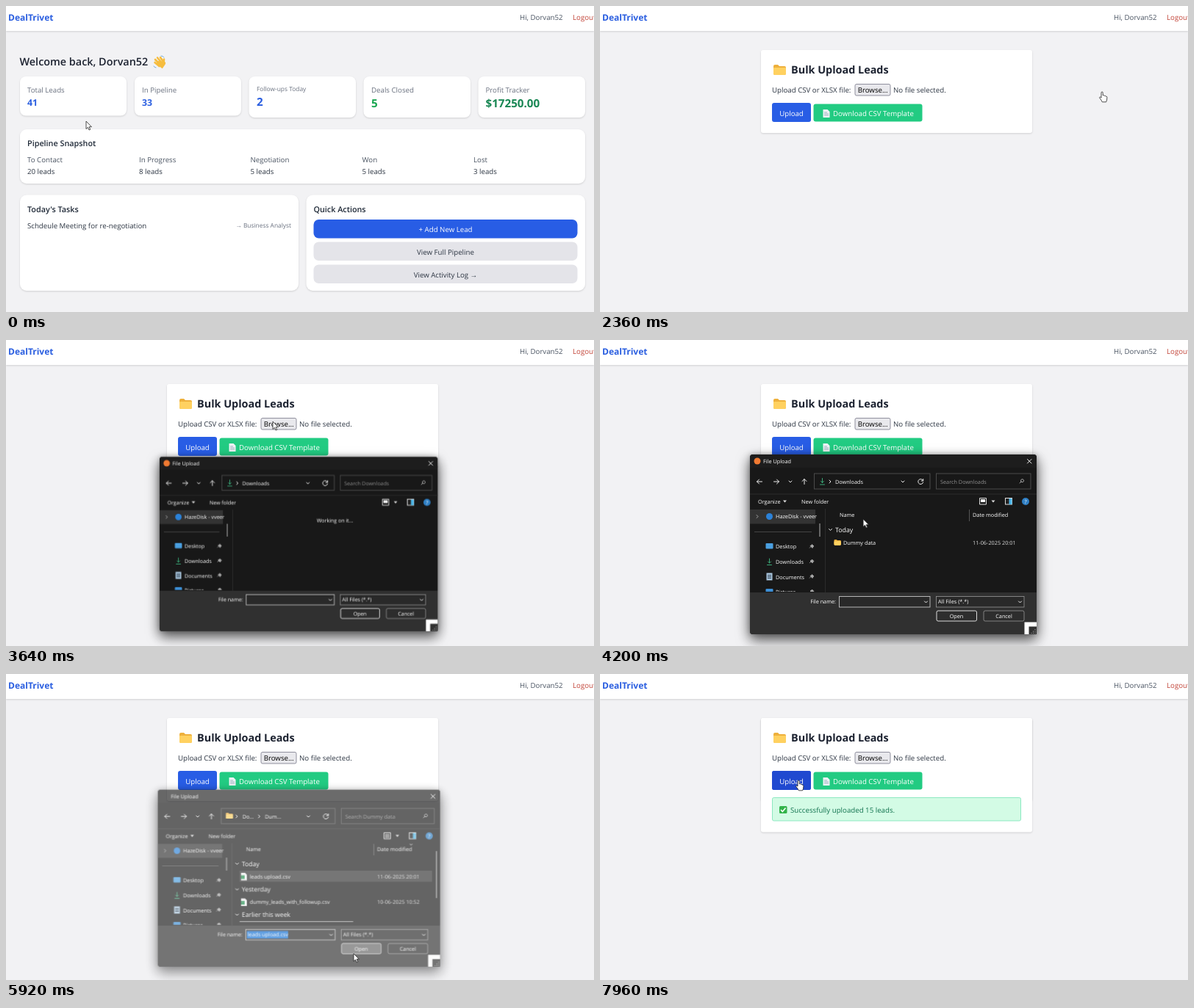
An HTML page for the animation above (8 s loop, 800 px wide and 417 px high).

```html
<!DOCTYPE html>
<html lang="en">
<head>
<meta charset="utf-8">
<title>Lead upload</title>
<style>
html, body { margin: 0; width: 100%; height: 100%; overflow: hidden; background: #f2f2f4; }
svg { display: block; width: 100%; height: 100%; }
text { font-family: "Open Sans", "Noto Sans", sans-serif; font-size: 9.7px; fill: #2d3643; text-rendering: geometricPrecision; white-space: pre; }
.sm { font-size: 8.4px; }
.h { font-size: 10.8px; font-weight: 600; fill: #1f2937; }
.title { font-size: 14.4px; font-weight: 700; fill: #1c2230; }
.grey { fill: #6b7280; } .pale { fill: #9ca3af; } .slate { fill: #4b5563; }
.blue { fill: #2a5ee0; } .white { fill: #fff; } .red { fill: #c24438; }
.num { font-size: 12.3px; font-weight: 700; }
.big { font-size: 15.2px; }
.logo { font-size: 12px; font-weight: 700; }
.semi { font-weight: 600; }
.mid { text-anchor: middle; } .end { text-anchor: end; }
.card { fill: #fff; filter: drop-shadow(0 1px 1.2px rgba(0,0,0,.14)); }
.line { fill: none; stroke: #efefef; stroke-width: 1; stroke-linecap: round; stroke-linejoin: round; }
.dialog text { font-size: 7.3px; fill: #fff; }
.dialog .group { font-size: 8.8px; }
.dialog .dim { fill: #8f8f8f; }
.dialog .date { fill: #dcdcdc; }

/* Timed parts: fully on or off inside one 8 s loop */
.t { opacity: 0; animation: 8s step-end infinite; }
@keyframes dash { 0% { opacity: 1 } 10% { opacity: 0 } }
@keyframes leads { 0% { opacity: 0 } 10% { opacity: 1 } 29% { opacity: 0 } }
@keyframes upload { 0% { opacity: 0 } 29% { opacity: 1 } }
@keyframes pipeline-hover { 0% { opacity: 0 } 3.5% { opacity: 1 } }
@keyframes leads-hover { 0% { opacity: 0 } 15.5% { opacity: 1 } }
@keyframes browse-hover { 0% { opacity: 0 } 35.5% { opacity: 1 } 44.5% { opacity: 0 } }
@keyframes working { 0% { opacity: 1 } 48% { opacity: 0 } }
@keyframes downloads { 0% { opacity: 1 } 58% { opacity: 0 } }
@keyframes listing { 0% { opacity: 0 } 48% { opacity: 1 } 58% { opacity: 0 } }
@keyframes folder-hover { 0% { opacity: 0 } 53.5% { opacity: 1 } }
@keyframes dummy { 0% { opacity: 0 } 58% { opacity: 1 } }
@keyframes row-hover { 0% { opacity: 1 } 66% { opacity: 0 } }
@keyframes chosen-name { 0% { opacity: 0 } 64.5% { opacity: 1 } }
@keyframes open-hover { 0% { opacity: 0 } 69% { opacity: 1 } }
@keyframes app-icon { 0% { opacity: 1 } 73.5% { opacity: 0 } }
@keyframes no-file { 0% { opacity: 1 } 75.5% { opacity: 0 } 95% { opacity: 1 } }
@keyframes has-file { 0% { opacity: 0 } 75.5% { opacity: 1 } 95% { opacity: 0 } }
@keyframes template-hover { 0% { opacity: 0 } 81% { opacity: 1 } 84.5% { opacity: 0 } }
@keyframes upload-hover { 0% { opacity: 0 } 85% { opacity: 1 } }
@keyframes success { 0% { opacity: 0 } 95% { opacity: 1 } }
@keyframes hand { 0% { opacity: 0 } 3.5% { opacity: 1 } 10% { opacity: 0 } 15.5% { opacity: 1 } 30% { opacity: 0 } 81% { opacity: 1 } }
@keyframes arrow { 0% { opacity: 1 } 3.5% { opacity: 0 } 10% { opacity: 1 } 15.5% { opacity: 0 } 30% { opacity: 1 } 81% { opacity: 0 } }

.dialog { transform-origin: 366px 262px; opacity: 0; animation: window 8s linear infinite; }
.frame { filter: drop-shadow(0 7px 9px rgba(0,0,0,.6)) drop-shadow(0 0 3px rgba(0,0,0,.3)); }
@keyframes window {
  0%, 44.4% { opacity: 0; transform: scale(.93) }
  45.2% { opacity: 1; transform: scale(.96) }
  45.5% { opacity: 1; transform: scale(.97) }
  47%, 73.5% { opacity: 1; transform: scale(1) }
  74% { opacity: .66; transform: scale(.985) }
  75%, 100% { opacity: 0; transform: scale(.95) }
}
.pointer { animation: move 8s ease-in-out infinite; }
@keyframes move {
  0%, .5% { transform: translate(109px, 157px) }
  4%, 10% { transform: translate(598px, 335px) }
  16%, 30% { transform: translate(683px, 117px) }
  36%, 49% { transform: translate(363px, 111px) }
  54%, 64.5% { transform: translate(357px, 274px) }
  69.5%, 75.5% { transform: translate(473px, 381px) }
  81% { transform: translate(436px, 152px) }
  86%, 100% { transform: translate(270px, 145px) }
}
</style>
</head>
<body>
<svg viewBox="0 0 800 417">
  <defs>
    <clipPath id="side"><rect x="204" y="228" width="91" height="115"/></clipPath>
    <clipPath id="files"><rect x="307" y="228" width="287" height="115"/></clipPath>
    <g id="folder"><path d="M0 2q0-2 2-2h4l2 2h7q2 0 2 2v8q0 2-2 2H2q-2 0-2-2z" fill="#eeb03c"/><path d="M0 5q0-1 1-1h15q1 0 1 1v7q0 2-2 2H2q-2 0-2-2z" fill="#ffd160"/></g>
    <g id="sheet"><path d="M0 0h5.500l2.500 2.500v8H0z" fill="#f4f4f4"/><rect y="3.500" width="5" height="5" fill="#1f8f4d"/></g>
    <path id="pin" d="M1 5l2-2M2 2l3 3 1-2 1-.500-2.500-2.500-.5 1z" fill="#aaa" stroke="#aaa" stroke-width=".8"/>
    <path id="down" class="line" d="M-2-1l2 2 2-2"/>
    <path id="right" class="line" d="M-1-2l2 2-2 2"/>
    <path id="back" class="line" d="M3.500 0h-7m3-3l-3 3 3 3"/>
  </defs>

  <rect width="800" height="417" fill="#f2f2f4"/>
  <rect class="card" y="-4" width="800" height="38"/>
  <text x="3" y="20" class="blue logo">DealTrivet</text>
  <text x="699" y="19" class="slate">Hi, Dorvan52</text>
  <text x="771" y="19" class="red">Logout</text>

  <!-- Dashboard -->
  <g class="t" style="animation-name:dash">
    <text x="18.500" y="81" class="title semi">Welcome back, Dorvan52</text>
    <g fill="none" stroke="#f6bd3f" stroke-width="2.600" stroke-linecap="round">
      <path d="M203 73l6 6M206 70.500l6 7M210 70l4 6M202.500 77l6 5M215 72.500l-.5 5"/>
      <path d="M208 78l4 3 2-3" stroke-width="6"/>
      <path d="M201 82q1 2 3 2M211 68q3 0 4 2" stroke="#6fa8d8" stroke-width="1"/>
    </g>
    <g class="card">
      <rect x="19" y="96" width="145" height="53.500" rx="8"/>
      <rect x="175" y="96" width="145" height="53.500" rx="8"/>
      <rect x="330.500" y="96" width="145.500" height="56" rx="8"/>
      <rect x="486.500" y="96" width="145.500" height="56" rx="8"/>
      <rect x="642.500" y="96" width="145.500" height="56" rx="8"/>
      <rect x="19" y="168" width="769" height="74" rx="9"/>
      <rect x="19" y="257.500" width="379" height="130.500" rx="9"/>
      <rect x="408.500" y="257.500" width="379.500" height="130.500" rx="9"/>
    </g>
    <text x="29" y="118" class="grey">Total Leads</text>
    <text x="185" y="118" class="grey">In Pipeline</text>
    <text x="341" y="116" class="grey sm">Follow-ups Today</text>
    <text x="497" y="118" class="grey">Deals Closed</text>
    <text x="652.500" y="118" class="grey">Profit Tracker</text>
    <text x="29" y="136" class="num blue">41</text>
    <text x="185" y="136" class="num blue">33</text>
    <text x="341" y="135.500" class="num big blue">2</text>
    <text x="497" y="138" class="num big" style="fill:#19a650">5</text>
    <text x="652.500" y="138" class="num big" style="fill:#198754">$17250.00</text>

    <text x="29" y="191" class="h">Pipeline Snapshot</text>
    <text x="29" y="213" class="slate">To Contact</text><text x="29" y="228.500">20 leads</text>
    <text x="181" y="213" class="slate">In Progress</text><text x="181" y="228.500">8 leads</text>
    <text x="332.500" y="213" class="slate">Negotiation</text><text x="332.500" y="228.500">5 leads</text>
    <text x="484.500" y="213" class="slate">Won</text><text x="484.500" y="228.500">5 leads</text>
    <text x="636" y="213" class="slate">Lost</text><text x="636" y="228.500">3 leads</text>

    <text x="29" y="281" class="h">Today's Tasks</text>
    <text x="29" y="303">Schdeule Meeting for re-negotiation</text>
    <text x="388" y="302" class="sm grey end">→ Business Analyst</text>
    <text x="418.500" y="281" class="h">Quick Actions</text>
    <rect x="418.500" y="291" width="359" height="25.500" rx="7" fill="#285de5"/>
    <rect x="418.500" y="321.500" width="359" height="25.500" rx="7" fill="#e4e4e9"/>
    <rect x="418.500" y="321.500" width="359" height="25.500" rx="7" fill="#d1d5db" class="t" style="animation-name:pipeline-hover"/>
    <rect x="418.500" y="352.500" width="359" height="25.500" rx="7" fill="#e4e4e9"/>
    <text x="598" y="308" class="mid white">+ Add New Lead</text>
    <text x="598" y="338.500" class="mid">View Full Pipeline</text>
    <text x="598" y="369.500" class="mid">View Activity Log →</text>
  </g>

  <!-- Lead list -->
  <g class="t" style="animation-name:leads">
    <text x="75" y="76.500" class="title">Your Leads</text>
    <rect x="75.500" y="96" width="435.500" height="40.500" rx="2" fill="#fff" stroke="#e2e3e8"/>
    <text x="85.500" y="120" class="pale">Search by title or contact...</text>
    <rect x="521.500" y="95.500" width="77.500" height="41" rx="2" fill="#e8e7ed"/>
    <text x="527" y="120">All Stages</text>
    <path d="M589.500 115l2.500 2.500 2.500-2.500" fill="none" stroke="#222" stroke-width="1.200"/>
    <rect x="609" y="95.500" width="51" height="41" rx="2.500" fill="#4182f0"/>
    <text x="634.500" y="120" class="mid white">Search</text>
    <rect x="670" y="95.500" width="61.500" height="41" rx="2.500" fill="#285de5"/>
    <rect x="670" y="95.500" width="61.500" height="41" rx="2.500" fill="#2049d0" class="t" style="animation-name:leads-hover"/>
    <text x="680" y="113" class="white semi">Upload</text>
    <text x="680" y="128.500" class="white semi">Leads</text>
    <g class="card">
      <rect x="75" y="147" width="656.500" height="90" rx="9"/>
      <rect x="75" y="247" width="656.500" height="90" rx="9"/>
      <rect x="75" y="347" width="656.500" height="90" rx="9"/>
    </g>
    <g transform="translate(85 170)">
      <text class="blue semi">Business Analyst</text>
      <text y="15">Contact: Theodor Galwick | theodor.galwick@example.com</text>
      <text y="28" class="sm grey">Stage: To Contact</text>
      <text y="41" class="sm pale">Created: Jun 10, 2025 10:52</text>
      <text y="54" class="sm blue">Next Follow-Up: Jun 20, 2025 00:00</text>
    </g>
    <g transform="translate(85 270)">
      <text class="blue semi">Finance Manager</text>
      <text y="15">Contact: Elsie Tarnow | elsie.tarnow@example.com</text>
      <text y="28" class="sm grey">Stage: To Contact</text>
      <text y="41" class="sm pale">Created: Jun 10, 2025 10:52</text>
      <text y="54" class="sm blue">Next Follow-Up: Jun 21, 2025 00:00</text>
    </g>
    <g transform="translate(85 370)">
      <text class="blue semi">Director of Engineering</text>
      <text y="15">Contact: Gordon Felwick | gordon.felwick@example.com</text>
      <text y="28" class="sm grey">Stage: To Contact</text>
      <text y="41" class="sm pale">Created: Jun 10, 2025 10:52</text>
    </g>
  </g>

  <!-- Upload form -->
  <g class="t" style="animation-name:upload">
    <rect class="card" x="219" y="60" width="369" height="113" rx="3"/>
    <g class="t" style="animation-name:success">
      <rect class="card" x="219" y="60" width="369" height="155.500" rx="3"/>
      <rect x="234.500" y="168.500" width="338" height="31.500" rx="2" fill="#d3fbe5" stroke="#8ce8c1"/>
      <rect x="244" y="180" width="10.500" height="10" rx="1.500" fill="#32b34a"/>
      <path d="M246 185l2.300 2.500 4.200-5" fill="none" stroke="#fff" stroke-width="1.500"/>
      <text x="259" y="188.500" style="fill:#12734f">Successfully uploaded 15 leads.</text>
    </g>
    <use href="#folder" x="236" y="80"/>
    <text x="260" y="92" class="title">Bulk Upload Leads</text>
    <text x="234" y="118">Upload CSV or XLSX file:</text>
    <rect x="347" y="106.500" width="48" height="15.500" rx="2" fill="#e9e9ed" stroke="#8f8f9d"/>
    <rect x="347" y="106.500" width="48" height="15.500" rx="2" fill="#afafb4" stroke="#6f6f7a" class="t" style="animation-name:browse-hover"/>
    <text x="371.200" y="118" class="mid" style="fill:#000">Browse...</text>
    <text x="399" y="118" class="t" style="animation-name:no-file">No file selected.</text>
    <text x="399" y="118" class="t" style="animation-name:has-file">leads upload.csv</text>
    <rect x="234" y="132" width="53" height="26" rx="3" fill="#285de5"/>
    <rect x="234" y="132" width="53" height="26" rx="3" fill="#2049d0" class="t" style="animation-name:upload-hover"/>
    <text x="260.500" y="149.500" class="mid white">Upload</text>
    <rect x="290.500" y="133.500" width="148" height="24" rx="3" fill="#22cb82"/>
    <rect x="290.500" y="133.500" width="148" height="24" rx="3" fill="#17b06e" class="t" style="animation-name:template-hover"/>
    <path d="M303.500 141h6l3 3v8h-9z" fill="#eef3f6"/>
    <path d="M305 145h4m-4 2h6m-6 2h6" stroke="#8fa5b4" stroke-width=".8"/>
    <text x="317" y="149.500" class="white">Download CSV Template</text>
  </g>

  <!-- File picker -->
  <g class="dialog">
    <rect class="frame" x="204" y="156" width="390" height="245" rx="4" fill="#181818"/>
    <path d="M204 174v-14q0-4 4-4h382q4 0 4 4v14z" fill="#1d1d1d"/>
    <path d="M204 344h390v53q0 4-4 4H208q-4 0-4-4z" fill="#303030"/>
    <circle cx="214" cy="165" r="4.500" fill="#f07a32" class="t" style="animation-name:app-icon"/>
    <text x="222" y="168">File Upload</text>
    <path class="line" d="M581.500 162.500l5.500 5.500m0-5.500l-5.500 5.500"/>
    <use href="#back" x="217" y="193"/>
    <use href="#back" transform="translate(240 193) rotate(180)"/>
    <use href="#down" x="259" y="193"/>
    <use href="#back" transform="translate(278 193) rotate(90)"/>
    <g fill="none" stroke="#505050" stroke-width=".9">
      <rect x="291.500" y="182" width="157.500" height="21"/>
      <rect x="457.500" y="182" width="128.500" height="21"/>
    </g>
    <use href="#down" x="412" y="193"/>
    <path class="line" d="M439.500 191.500a3.500 3.500 0 1 0 .2 2.500m0-4.500v2.500h-2.500"/>
    <path class="line" d="M571 195l2-2a2 2 0 1 1 .3.300" style="stroke:#aaa"/>
    <use href="#right" x="313" y="193"/>
    <g class="t" style="animation-name:downloads">
      <path class="line" style="stroke:#3aa978" d="M302.500 188.500v6m-2-2l2 2 2-2m-5 4.500h6"/>
      <text x="320" y="195.500">Downloads</text>
      <text x="463" y="195.500" class="dim">Search Downloads</text>
    </g>
    <g class="t" style="animation-name:dummy">
      <use href="#folder" transform="translate(298 188) scale(.58)"/>
      <text x="321" y="195.500">Do...</text>
      <use href="#right" x="344" y="193"/>
      <text x="352" y="195.500">Dum...</text>
      <text x="463" y="195.500" class="dim">Search Dummy data</text>
    </g>
    <path d="M204 210h390M306.500 230v114" stroke="#2c2c2c"/>
    <text x="215" y="222.500">Organize</text>
    <path d="M249 218.500h5l-2.500 3zM532.500 218.500h5l-2.500 3z" fill="#ddd"/>
    <text x="274" y="222.500">New folder</text>
    <path d="M516.500 215.500h9v8.500h-9z" fill="none" stroke="#ddd"/>
    <rect x="518" y="217" width="6" height="4" fill="#f2f2f2" class="t" style="animation-name:downloads"/>
    <path d="M518 218h6m-6 2h6m-6 2h6" stroke="#ddd" class="t" style="animation-name:dummy"/>
    <rect x="551.500" y="215.500" width="9" height="8.500" fill="#222" stroke="#ddd"/>
    <rect x="556.500" y="216" width="4" height="8" fill="#4ab5e8"/>
    <circle cx="579" cy="220" r="5" fill="#2f7fc4"/>
    <text x="579" y="222.800" class="mid">?</text>

    <g clip-path="url(#side)">
      <rect x="204" y="231" width="89" height="19.500" fill="#333"/>
      <use href="#right" x="214" y="240.500" opacity=".6"/>
      <circle cx="230.500" cy="240.500" r="4.500" fill="#2b82d9"/>
      <text x="239" y="243">HazeDisk - vveer</text>
      <path d="M210 261.500h78" stroke="#444"/>
      <rect x="225.500" y="277" width="10" height="7.500" rx="1" fill="#4a9fe0"/>
      <path class="line" style="stroke:#3aa978" d="M230.500 298v6m-2-2l2 2 2-2m-5 4.500h6"/>
      <path d="M226.500 317.500h8v10h-8z" fill="#a9c5dc"/><path d="M228 320.500h5m-5 2h5m-5 2h5" stroke="#345"/>
      <rect x="225.500" y="339" width="10" height="8" rx="1" fill="#3d8fd6"/>
      <text x="239" y="284">Desktop</text><text x="239" y="305">Downloads</text>
      <text x="239" y="325.500">Documents</text><text x="239" y="346">Pictures</text>
      <use href="#pin" x="284" y="278.500"/><use href="#pin" x="284" y="299"/>
      <use href="#pin" x="284" y="319.500"/><use href="#pin" x="284" y="340"/>
    </g>
    <path d="M299 250v18" stroke="#9a9a9a" stroke-width="1.200"/>

    <text x="450" y="247.500" class="mid t" style="animation-name:working">Working on it...</text>
    <g class="t" style="animation-name:listing">
      <text x="326" y="241">Name</text><text x="507" y="241">Date modified</text>
      <path d="M502.500 231v16" stroke="#555"/>
      <use href="#down" x="313.500" y="258.500"/><text x="320" y="262" class="group">Today</text>
      <rect x="317" y="268" width="266" height="15.500" fill="#4d4d4d" class="t" style="animation-name:folder-hover"/>
      <use href="#folder" transform="translate(318.500 272) scale(.55)"/>
      <text x="331" y="278.500">Dummy data</text><text x="507" y="278.500" class="date">11-06-2025 20:01</text>
    </g>
    <g class="t" style="animation-name:dummy" clip-path="url(#files)">
      <text x="326" y="241">Name</text><text x="507" y="241">Date modified</text>
      <path d="M502.500 231v16" stroke="#555"/>
      <use href="#down" transform="translate(554 232) scale(.8)"/>
      <use href="#down" x="313.500" y="258.500"/><use href="#down" x="313.500" y="294"/><use href="#down" x="313.500" y="329"/>
      <text x="320" y="262" class="group">Today</text>
      <rect x="317" y="268" width="266" height="15.500" fill="#333"/>
      <rect x="317" y="268" width="266" height="15.500" fill="#4d4d4d" class="t" style="animation-name:row-hover"/>
      <use href="#sheet" x="319" y="271"/>
      <text x="331" y="278.500">leads upload.csv</text><text x="507" y="278.500" class="date">11-06-2025 20:01</text>
      <text x="320" y="297" class="group">Yesterday</text>
      <use href="#sheet" x="319" y="306.500"/>
      <text x="331" y="314">dummy_leads_with_followup.csv</text><text x="507" y="314" class="date">10-06-2025 10:52</text>
      <text x="320" y="332" class="group">Earlier this week</text>
      <path d="M317 338.500h157M589 241v65" stroke="#b0b0b0" stroke-width="1.200"/>
    </g>

    <text x="321" y="359" class="end">File name:</text>
    <rect x="325.500" y="349.500" width="123.500" height="14.500" fill="#292929" stroke="#c5c5c5" stroke-width=".9"/>
    <rect x="457.500" y="349.500" width="119.500" height="14.500" fill="#292929" stroke="#999" stroke-width=".8"/>
    <text x="460" y="359">All Files (*.*)</text>
    <use href="#down" x="443.500" y="357"/><use href="#down" x="571.500" y="357"/>
    <g class="t" style="animation-name:chosen-name">
      <rect x="327" y="351.500" width="57" height="10.500" fill="#1473d8"/>
      <text x="328" y="359">leads upload.csv</text>
    </g>
    <rect x="458" y="369" width="54.500" height="14" rx="2" fill="#2d2d2d" stroke="#f0f0f0" stroke-width=".9"/>
    <rect x="458" y="369" width="54.500" height="14" rx="2" fill="#686868" stroke="#a5a5a5" stroke-width=".9" class="t" style="animation-name:open-hover"/>
    <rect x="522" y="369" width="55" height="14" rx="2" fill="#2d2d2d" stroke="#999" stroke-width=".8"/>
    <text x="485" y="378.700" class="mid">Open</text><text x="549.500" y="378.700" class="mid">Cancel</text>
    <rect x="577.500" y="384.500" width="16.500" height="16.500" fill="#fff"/>
    <rect x="583.500" y="390.500" width="10.500" height="10.500" fill="#303030"/>
    <path d="M592 394v6m-2.500-3.500v3.500m-2.500-1v1" stroke="#aaa" stroke-dasharray="1.200 1.200"/>
  </g>

  <g class="pointer">
    <path class="t" style="animation-name:arrow" d="M0 0v10.500l2.400-2.200 1.600 3.700 1.700-.7-1.600-3.600h3.300z" fill="#fff" stroke="#222" stroke-width=".8"/>
    <path class="t" style="animation-name:hand" d="M-1 1.200q0-1.200 1.100-1.200t1.100 1.200v3.600q2-.6 2.200.6 1.600-.4 1.900.8 1.600-.2 1.600 1.300 0 4-1.300 6.300H.3Q-.8 11-3.200 8.500q-.6-1.500.8-1.500l1.400 1.100z" fill="#fff" stroke="#222" stroke-width=".8"/>
  </g>
</svg>
</body>
</html>
```
